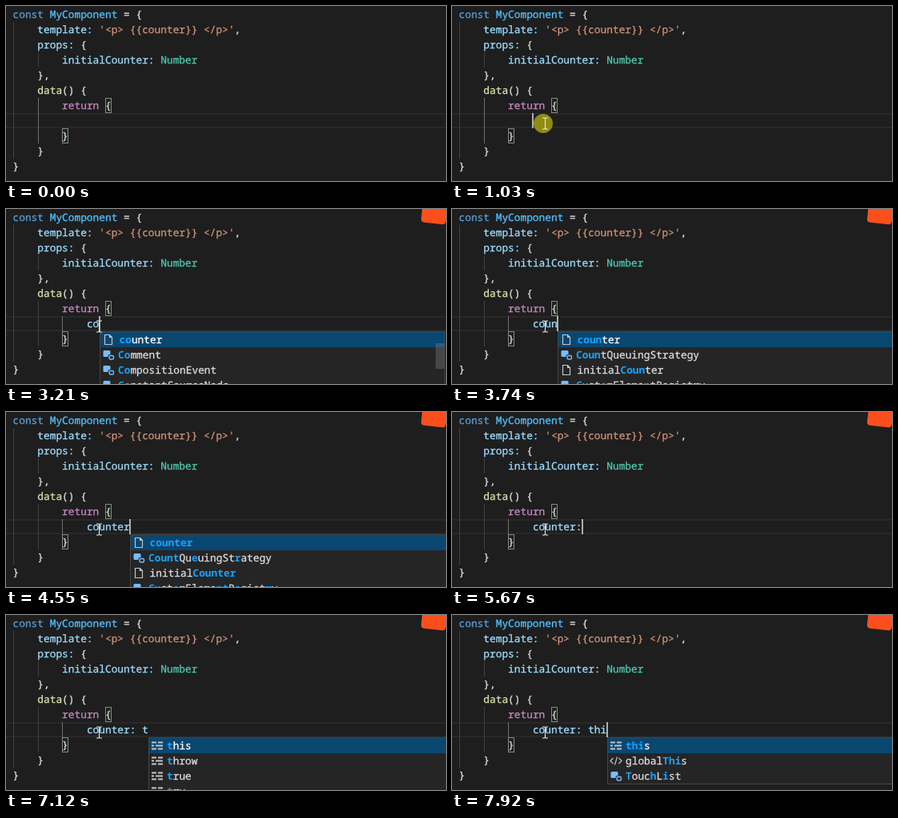
These frames come from a looping animation (550 by 219 pixels, 8000 ms). An HTML page:

```html
<!DOCTYPE html>
<html lang="en">
<head>
<meta charset="utf-8">
<title>Typing in a code editor</title>
<style>
  html, body { margin: 0; width: 100%; height: 100%; overflow: hidden; background: #1e1e1e; }
  svg { display: block; width: 550px; height: 219px; }
  text {
    font: 12.83px "Noto Sans Mono", monospace;
    text-rendering: geometricPrecision;
    color: #dcdcdc;
    white-space: pre;
  }
  text, tspan { fill: currentColor; stroke: currentColor; stroke-width: .3px; }
  .key { color: #569cd6; }
  .const { color: #4fc1ff; }
  .var { color: #9cdcfe; }
  .str { color: #ce9178; }
  .type { color: #4ec9b0; }
  .fn { color: #dcdcaa; }
  .ctl { color: #c586c0; }
  .chosen { color: #fff; }
  .hit { color: #18a3ff; font-weight: 700; stroke: none; }
  .guide { fill: #404040; }
  .guide.active { fill: #707070; }
  .bracket { fill: rgba(0, 100, 0, .1); stroke: #888; }
  .line { fill: none; stroke: #c5c5c5; stroke-width: 1.2; }
</style>
</head>
<body>
<svg id="stage" viewBox="0 0 550 219">
  <rect width="550" height="219" fill="#1e1e1e"/>
  <rect x="-3" y="135" width="560" height="17" fill="none" stroke="#282828" stroke-width="2"/>
  <rect class="guide" x="9" y="20" width="1" height="171"/>
  <rect class="guide" x="40" y="58" width="1" height="19"/>
  <rect class="guide" id="outer" x="40" y="115" width="1" height="57"/>
  <rect class="guide active" id="inner" x="70" y="134" width="1" height="19"/>
  <rect class="bracket" x="124.5" y="115.5" width="7" height="18"/>
  <rect class="bracket" x="70.5" y="153.5" width="7" height="18"/>
  <g id="code"></g>
  <path id="error" d="M70 171 l2 -2 l2 2 l2 -2 l2 2 l1 -1" fill="none" stroke="#e0483e" stroke-width="1.1"/>
  <text id="typed" y="148"></text>
  <rect id="caret" y="134" width="2" height="19" fill="#aeafad"/>
  <g id="popup"></g>
  <rect id="badge" x="520" y="-13" width="31" height="31" rx="4" fill="#fa4f1c" transform="rotate(6 535 3)"/>
  <circle id="click" cx="114" cy="147" r="12" fill="#9c970f" fill-opacity=".9"/>
  <path id="mouse" d="M-3.5 -7 h2.5 l1 1 l1 -1 h2.5 M0 -6 V6 M-3.5 7 h2.5 l1 -1 l1 1 h2.5" fill="none" stroke="#e8e8e8" stroke-width="1.1"/>
</svg>
<script>
const LOOP = 8000, CHAR = 7.7, LEFT = 8.5, ROW = 19;
const $ = id => document.getElementById(id);
const colX = col => LEFT + col * CHAR;
const span = (cls, s) => `<tspan class="${cls}">${s.replace(/</g, '&lt;')}</tspan>`;
const show = (id, on) => $(id).style.display = on ? '' : 'none';

// [indent, class, text, class, text, ...]
const code = [
  [0, 'key', 'const', 'const', ' MyComponent', '', ' = {'],
  [4, 'var', 'template:', 'str', " '<p> {{counter}} </p>'", '', ','],
  [4, 'var', 'props:', '', ' {'],
  [8, 'var', 'initialCounter:', 'type', ' Number'],
  [4, '', '},'],
  [4, 'fn', 'data', '', '() {'],
  [8, 'ctl', 'return', '', ' {'],
  [12],
  [8, '', '}'],
  [4, '', '}'],
  [0, '', '}']
];
$('code').innerHTML = code.map(([indent, ...parts], row) => {
  let out = '';
  for (let i = 0; i < parts.length; i += 2) out += span(parts[i], parts[i + 1]);
  return `<text x="${colX(indent)}" y="${15 + row * ROW}">${out}</text>`;
}).join('');

// Each track lists [start time, value].
const typing = [
  [0, ''], [2240, 'c'], [3210, 'co'], [3480, 'cou'], [3740, 'coun'], [4200, 'count'],
  [4470, 'counte'], [4550, 'counter'], [5340, 'counter:'], [6000, 'counter: '],
  [6450, 'counter: t'], [7850, 'counter: th'], [7920, 'counter: thi']
];
const blink = [[0, 0], [1030, 1], [1560, 0], [2040, 1], [5010, 0], [5340, 1], [6990, 0], [7520, 1]];

// Rows are "icon name".
const countRows = ['page counter', 'iface CountQueuingStrategy', 'page initialCounter', 'iface CustomElementRegistry'];
const lists = [
  [0, null],
  [2710, ['page counter', 'iface Cache', 'iface CacheStorage', 'iface caches']],
  [3210, ['page counter', 'iface Comment', 'iface CompositionEvent', 'iface ConstantSourceNode']],
  [3480, countRows],
  [5670, null],
  [6720, ['dash this', 'dash throw', 'dash true', 'dash try']],
  [7850, ['dash this', 'dash throw', 'tag globalThis', 'iface TouchList']],
  [7920, ['dash this', 'tag globalThis', 'iface TouchList']]
];

const icons = {
  page: '<path class="line" d="M-4.5 -6 h6 l3 3 v9 h-9 z M1.5 -6 v3 h3"/>',
  iface: '<rect x="-6.5" y="-5.5" width="9" height="8" rx="1.5" fill="#75beff"/>' +
    '<rect x="-.5" y="-.5" width="8" height="7" rx="2" fill="#252526"/>' +
    '<rect x="1" y="1" width="5.5" height="4.5" rx="1.5" fill="none" stroke="#75beff" stroke-width="1.4"/>',
  dash: '<path class="line" style="stroke-width:2" d="M-7 -4 h6 m2 0 h6 M-7 0 h3 m2 0 h9 M-7 4 h6 m2 0 h6"/>',
  tag: '<path class="line" d="M-3.5 -3.5 l-3.5 3.5 l3.5 3.5 M1.5 -5 l-3 10 M3.5 -3.5 l3.5 3.5 l-3.5 3.5"/>'
};

const at = (track, t) => track.findLast(step => step[0] <= t)[1];

function findHits(name, query) {
  const hits = new Set();
  let from = 0;
  for (const ch of query) {
    const i = name.toLowerCase().indexOf(ch, from);
    if (i < 0) return null;
    hits.add(i);
    from = i + 1;
  }
  return hits;
}

// Fuzzy match, allowing the second and third letters to be swapped.
function mark(name, query) {
  const swapped = query.replace(/^(.)(.)(.)/, '$1$3$2');
  const hits = findHits(name, query) || findHits(name, swapped) || new Set();
  return [...name].map((ch, i) => span(hits.has(i) ? 'hit' : '', ch)).join('');
}

function popup(rows, text) {
  if (!rows) return '';
  const word = text.replace(':', '').split(' ').pop();
  const col = 12 + text.replace(/:$/, '').length;
  const x = Math.ceil(colX(col)), h = rows.length * ROW;
  return `<rect x="${x + .5}" y="153.5" width="431" height="${h + 1}" fill="#252526" stroke="#454545"/>` +
    `<rect x="${x + 1}" y="154" width="430" height="${ROW}" fill="#094771"/>` +
    rows.map((row, i) => {
      const [icon, name] = row.split(' ');
      const y = 163.5 + i * ROW, textX = x + (icon === 'page' ? 24.5 : 23);
      return `<g transform="translate(${x + 11} ${y})">${icons[icon]}</g>` +
        `<text class="${i ? '' : 'chosen'}" x="${textX}" y="${y + 4}">${mark(name, word)}</text>`;
    }).join('') +
    (rows.length > 3 ? `<rect x="${x + 420}" y="168" width="11" height="32" fill="#797979" fill-opacity=".4"/>` : '');
}

// Pointer path: [time, x, y]
const path = [[70, 545, 4], [220, 490, 110], [370, 385, 208], [530, 250, 196], [680, 152, 160], [830, 116.5, 147]];
function pointer(t) {
  const s = Math.min(830, 70 + Math.floor((t - 70) / 76) * 76);
  const i = Math.max(1, path.findIndex(p => p[0] >= s));
  const [t0, x0, y0] = path[i - 1], [t1, x1, y1] = path[i];
  const k = (s - t0) / (t1 - t0);
  return [x0 + (x1 - x0) * k, y0 + (y1 - y0) * k];
}

function typedMarkup(text, t) {
  const fresh = (t >= 2240 && t < 2440) || (t >= 6450 && t < 6520);
  const [name, value] = text.split(' ');
  if (value === undefined) return span(fresh ? '' : 'var', name);
  return span('var', name) + ' ' + span(fresh ? '' : 'var', value);
}

const last = {};
function setMarkup(id, html) {
  if (last[id] !== html) $(id).innerHTML = last[id] = html;
}

function draw(t) {
  const text = at(typing, t);
  $('typed').setAttribute('x', colX(12));
  setMarkup('typed', typedMarkup(text, t));
  setMarkup('popup', popup(at(lists, t), text));
  $('caret').setAttribute('x', Math.floor(colX(12 + text.length)));
  show('caret', at(blink, t));
  $('outer').classList.toggle('active', t < 2240);
  show('inner', t >= 2240);
  show('error', t >= 5870 && t < 7120);
  show('badge', t >= 1160);
  show('click', t >= 900 && t < 1100);
  show('mouse', t >= 70);
  if (t >= 70) $('mouse').setAttribute('transform', `translate(${pointer(t)})`);
}

let start;
function tick(now) {
  start ??= now;
  draw((now - start) % LOOP);
  requestAnimationFrame(tick);
}
draw(0);
requestAnimationFrame(tick);
</script>
</body>
</html>
```
